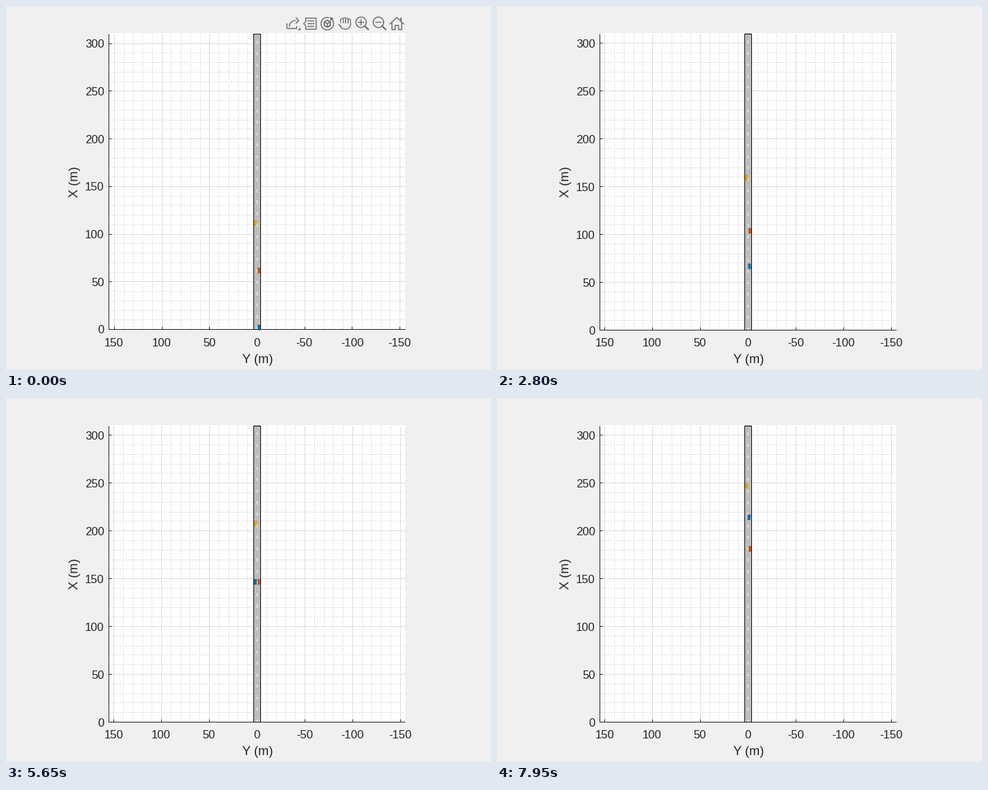
A matplotlib script that plays this animation: 700 by 525 pixels, repeating every 8 s.

```python
import math
import numpy as np
import matplotlib.pyplot as plt
from matplotlib.animation import FuncAnimation
from matplotlib.patches import Polygon, Rectangle

W, H, DPI = 700, 525, 100
FRAMES, STEP = 160, 50
PX = 72 / DPI
INK, ICON = "#262626", "#6e6e6e"
LEFT, RIGHT, MID = 148.5, 576.5, 362.5
SPAN, HALF_ROAD, LANE = 310, 3.6, 1.8
CAR_LEN, CAR_WIDTH = 4.7, 1.8

plt.rcParams["font.family"] = "Liberation Sans"
fig = plt.figure(figsize=(W / DPI, H / DPI), dpi=DPI, facecolor="#f0f0f0")
ax = fig.add_axes([0, 0, 1, 1])
ax.set_xlim(0, W)
ax.set_ylim(H, 0)
ax.axis("off")


def line(xs, ys, color=INK, width=1.0, z=2, snap=True, cap="butt", **kw):
    # Snapping rounds half up, so step back half a pixel first.
    half = 0.5 if snap else 0
    return ax.plot(np.asarray(xs) - half, np.asarray(ys) + half, color=color,
                   lw=width * PX, zorder=z, snap=snap,
                   solid_capstyle=cap, **kw)[0]


def rect(x0, y0, x1, y1, color, z):
    return ax.add_patch(Rectangle((x0, y0), x1 - x0, y1 - y0, fc=color,
                                  ec="none", zorder=z))


def text(x, y, s, size, va="baseline", **kw):
    return ax.text(x, y, s, fontsize=size * PX, color=INK, va=va, **kw)


class Stage:
    """Axes, grid and road for one placement of the plot box."""

    def __init__(self, top, bottom):
        self.top, self.bottom = top, bottom
        self.scale = (bottom - top) / SPAN
        self.items = [rect(LEFT - 0.5, top - 0.5, RIGHT - 0.5, bottom + 0.5,
                           "white", 0)]
        self.grid()
        self.road()
        self.rulers()

    def px(self, y):
        return MID - y * self.scale

    def py(self, x):
        return self.bottom - x * self.scale

    def add(self, *args, **kw):
        self.items.append(line(*args, **kw))

    def grid(self):
        for v in range(-150, SPAN, 10):
            style = {"color": "#dcdcdc"} if v % 50 == 0 else {
                "color": "#d9d9d9", "dashes": (2, 2)}
            if v >= 0:
                self.add([LEFT, RIGHT], [self.py(v)] * 2, z=1, **style)
            if v <= 150:
                self.add([self.px(v)] * 2, [self.top, self.bottom], z=1, **style)

    def road(self):
        x0, x1 = self.px(HALF_ROAD), self.px(-HALF_ROAD)
        self.items.append(rect(x0, self.top, x1, self.bottom, "#c6c6c3", 3))
        for v in range(2, SPAN, 2):
            self.add([x0, x1], [self.py(v)] * 2, color="#adadab", z=3.1,
                     snap=False)
        for v in range(0, SPAN, 12):
            self.add([MID, MID], [self.py(v), self.py(v + 3)],
                     color="white", z=3.2)
        self.add([x0, x1, x1, x0, x0],
                 [self.top, self.top, self.bottom, self.bottom, self.top],
                 color="#111111", z=3.3)

    def rulers(self):
        b = self.bottom
        self.add([LEFT, LEFT, RIGHT], [self.top, b, b])
        for v in range(-150, 301, 50):
            if v >= 0:
                y = self.py(v)
                self.add([LEFT, LEFT + 4], [y, y])
                self.items.append(text(141.7, y + 7, str(v), 16.67, ha="right"))
            if v <= 150:
                x = self.px(v)
                self.add([x, x], [b, b - 4])
                self.items.append(text(x - 0.5, 491, str(v), 16.67, ha="center"))

    def show(self, on):
        for item in self.items:
            item.set_visible(on)


def arc(x, y, r, start=0, end=360, n=40):
    a = np.radians(np.linspace(start, end, n + 1))
    return x + r * np.cos(a), y + r * np.sin(a)


def toolbar(y=25.5, gap=25.1):
    parts = []
    export, note, orbit, hand, plus, minus, home = (
        413.5 + gap * k for k in range(7))

    def stroke(xs, ys, width=1.5):
        parts.append(line(xs, ys, ICON, width, 6, snap=False, cap="round"))

    def seg(x0, y0, x1, y1, width=1.5):
        stroke([x0, x1], [y0, y1], width)

    def fill(xs, ys):
        parts.append(ax.add_patch(Polygon(np.column_stack([xs, ys]), fc=ICON,
                                          ec="none", zorder=6)))

    # export: tray with an arrow curving out, and a corner mark
    stroke(export + np.array([-8, -8, 6, 6]), y + np.array([0, 7, 7, 4]))
    stroke(*arc(export + 4, y + 4, 8.5, 180, 270))
    stroke(*arc(export + 5, y - 4.5, 4, -90, 90, 2))
    fill(export + np.array([7, 11, 11]), y + np.array([9, 9, 5]))

    # note with three text rows
    stroke(note + np.array([-6, 9, 9, -6, -6, -9, -6, -6]),
           y + np.array([-8, -8, 8, 8, 3, 0, -3, -8]))
    for dy in (-4, 0, 4):
        seg(note - 3, y + dy, note + 6, y + dy)

    # cube inside a turning arrow
    stroke(*arc(orbit, y, 9, -35, 285))
    fill(*arc(orbit + 6, y - 7, 3.5, 0, 360, 3))
    stroke(*arc(orbit, y, 5, 30, 390, 6), 1.8)
    for turn in (90, 210, 330):
        xs, ys = arc(orbit, y, 5, turn, turn, 1)
        seg(orbit, y, xs[0], ys[0])

    # open hand
    for k in range(4):
        x, tip = hand - 4 + 3.6 * k, y - 9 + 1.2 * abs(k - 1.2)
        stroke(*arc(x, tip + 1.8, 1.8, 180, 360), 1.2)
        for side in (-1.8, 1.8):
            seg(x + side, tip + 2, x + side, y - 1, 1.2)
    stroke(*arc(hand + 0.7, y, 8, 0, 150), 1.4)
    seg(hand - 9, y + 1, hand - 5, y + 4, 1.4)

    for x in (plus, minus):
        lens = x - 1.5
        stroke(*arc(lens, y - 2, 7.5))
        seg(lens + 5.5, y + 3.5, lens + 10.5, y + 8.5, 2.2)
        seg(lens - 4, y - 2, lens + 4, y - 2)
    seg(plus - 1.5, y - 6, plus - 1.5, y + 2)

    # house
    stroke(home + np.array([-10, 0, 10]), y + np.array([0.5, -9, 0.5]))
    for side in (-1, 1):
        stroke(home + side * np.array([7, 7, 2.5, 2.5, 0]),
               y + np.array([-1.5, 8.5, 8.5, 2.5, 2.5]))
    seg(home + 6, y - 8, home + 6, y - 4, 2)
    return parts


def smooth(u):
    u = min(max(u, 0), 1)
    return u * u * (3 - 2 * u)


def passer(t):
    """Speeds up towards 30 m/s, moves left to overtake, then returns."""
    x = 1.25 + 30 * t - 27 * (1 - math.exp(-t / 2.25))
    y = -LANE + 2 * LANE * (smooth((t - 2.4) / 1.9) - smooth((t - 6.7) / 1.8))
    return x, y


# Fill, edge and path of each car
CARS = [
    ("#0072bd", "#0f6ca8", passer),
    ("#d95319", "#c8531f", lambda t: (61.2 + 15 * t, -LANE)),
    ("#edb120", "#d6a022", lambda t: (111.3 + 17 * t, LANE)),
]

text(363, 515, "Y (m)", 18.3, ha="center")
text(108, 253.5, "X (m)", 18.3, va="center", ha="right", rotation=90)

first, settled = Stage(39.5, 465.5), Stage(39.0, 466.5)
tools = toolbar()
bodies = [ax.add_patch(Polygon(np.zeros((4, 2)), fc=fc, ec=ec, lw=1.5 * PX,
                               joinstyle="miter", snap=False, zorder=5))
          for fc, ec, _ in CARS]
corners = np.array([(-1, -1), (1, -1), (1, 1), (-1, 1)]) * (
    CAR_LEN / 2, CAR_WIDTH / 2)


def draw(i):
    t = i * STEP / 1000
    stage = first if i == 0 else settled
    first.show(stage is first)
    settled.show(stage is settled)
    for part in tools:
        part.set_visible(i == 0 or 18 <= i < 23)
    for body, (_, _, path) in zip(bodies, CARS):
        x, y = path(t)
        ahead = path(t + 0.01)
        a = math.atan2(ahead[1] - y, ahead[0] - x)
        c, s = math.cos(a), math.sin(a)
        pts = corners @ np.array([(c, s), (-s, c)]) + (x, y)
        body.set_xy([(stage.px(q), stage.py(p)) for p, q in pts])
    return bodies


anim = FuncAnimation(fig, draw, frames=FRAMES, interval=STEP,
                     repeat=True, repeat_delay=0, blit=False)
plt.show()
```
